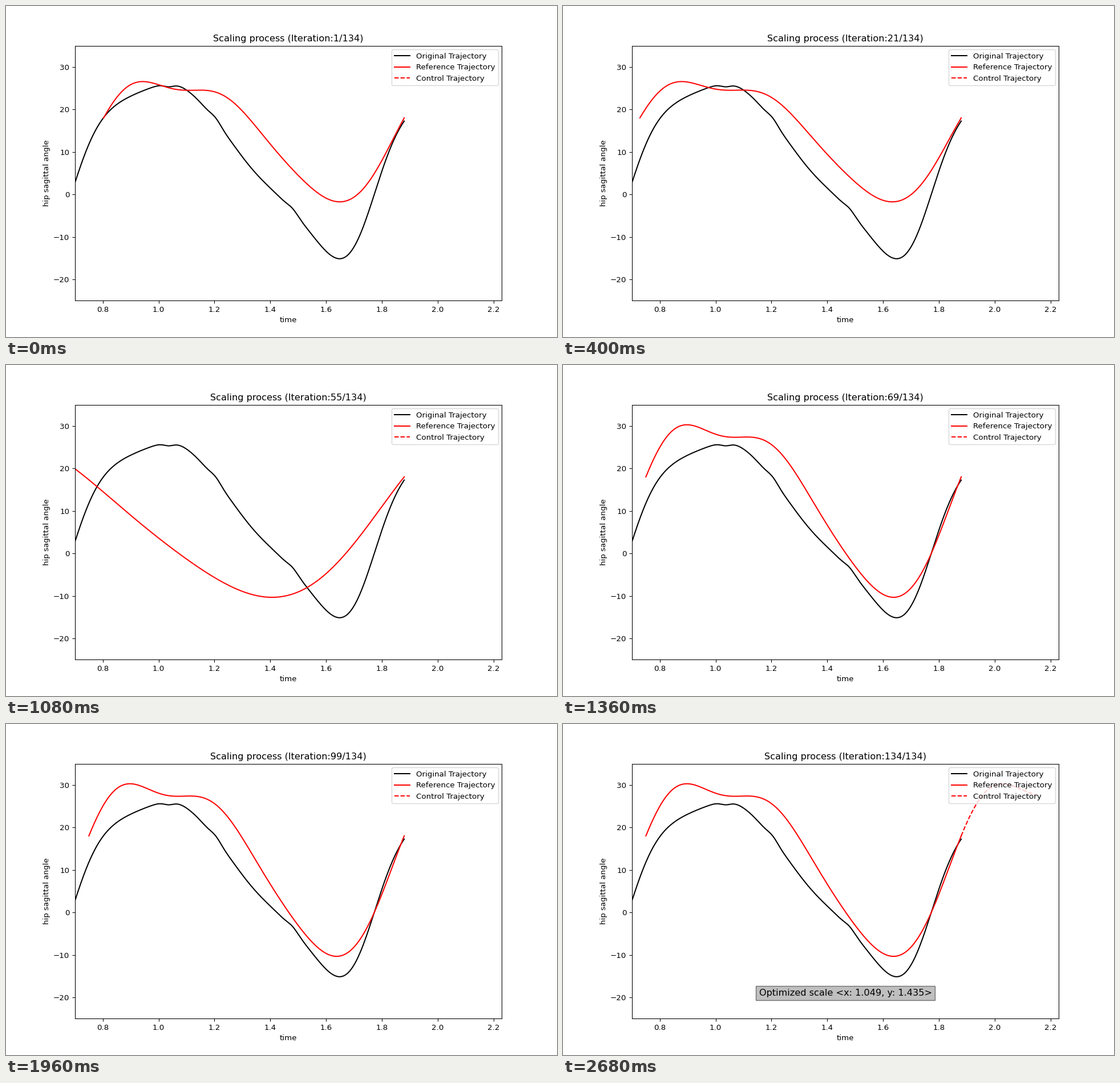
Write a matplotlib script that moves like this. It is 966 px wide and 580 px high and loops after 3.88 s.

```python
import numpy as np
import matplotlib.pyplot as plt
from matplotlib.animation import FuncAnimation

WIDTH, HEIGHT, DPI = 966, 580, 96.6
INTERVAL = 40
MOVING_FRAMES, HOLD_FRAMES = 67, 30
EVALUATIONS = 134
END_TIME, END_ANGLE = 1.88, 18.0
GOLDEN = (1 + 5**0.5) / 2

# Line searches: first evaluation, axis (0 = time, 1 = angle), scale found.
SEARCHES = [(2, 0, 1.069), (22, 1, 1.424), (32, 0, 1.0495),
            (44, 1, 1.4345), (54, 0, 1.049), (76, 1, 1.435)]
# Bracketing and golden-section offsets that open every search.
PROBES = [0, 1, -GOLDEN, 0, 1 - GOLDEN, 2 - GOLDEN]


def gait(phase, mean, cosines, sines):
    """Periodic joint angle as a short Fourier series."""
    angle = np.full_like(phase, mean)
    for k, (a, b) in enumerate(zip(cosines, sines), start=1):
        angle += a * np.cos(k * phase) + b * np.sin(k * phase)
    return angle


def bump(t, center, height, width=0.018):
    return height * np.exp(-0.5 * ((t - center) / width) ** 2)


def original_curve():
    t = np.linspace(0.66, END_TIME, 400)
    angle = gait(2 * np.pi * (t - 0.8) / 1.086, 8.43,
                 (4.25, 3.06, 2.05, 0.2, -0.07, -0.1),
                 (18.7, 1.94, -1.3, -0.65, -0.12, 0))
    return t, angle + bump(t, 1.036, -0.65) + bump(t, 1.205, 0.7) + bump(t, 1.48, 0.6)


def reference_curve():
    t = np.linspace(0.803, END_TIME, 400)
    angle = gait(2 * np.pi * (t - t[0]) / (END_TIME - t[0]), 14.62,
                 (0.14, 2.78, 0.6, -0.13), (13.91, 1.59, 0.99, 0.04))
    return t, angle


def scales(evaluation):
    """Time and angle scale tried at one evaluation of the optimizer."""
    point = np.ones(2)
    round_start = point.copy()
    ends = [search[0] for search in SEARCHES[1:]] + [EVALUATIONS + 2]
    for (start, axis, best), end in zip(SEARCHES, ends):
        if evaluation < start:
            break
        step, origin = evaluation - start, point[axis]
        if axis == 0:
            round_start = point.copy()
        if step < len(PROBES):
            point[axis] += PROBES[step]
            break
        # Angle is quadratic and settles at once; time closes in gradually.
        gap = 0.13 * 0.6 ** (step - 7) if axis == 0 and evaluation < end else 0
        point[axis] = best - gap * (best - origin)
        if axis == 1 and evaluation == end - 1:
            point = 2 * point - round_start
    return point


ref_time, ref_angle = reference_curve()

# The small margin keeps rounding from losing a pixel.
fig, ax = plt.subplots(figsize=((WIDTH + 0.01) / DPI, (HEIGHT + 0.01) / DPI), dpi=DPI)
ax.set_xlim(0.7, 2.23)
ax.set_ylim(-25, 35)
ax.set_xlabel("time")
ax.set_ylabel("hip sagittal angle")
title = ax.set_title("")
ax.plot(*original_curve(), "k", label="Original Trajectory")
reference, = ax.plot([], [], "r", label="Reference Trajectory")
control, = ax.plot([], [], "r--", label="Control Trajectory")
ax.legend(loc="upper right")
result = ax.text(0.5, 0.1, "", transform=ax.transAxes, fontsize=12,
                 ha="center", va="center",
                 bbox={"facecolor": "grey", "alpha": 0.5})


def update(frame):
    evaluation = min(2 * frame + 1, EVALUATIONS)
    done = evaluation == EVALUATIONS
    sx, sy = scales(evaluation)
    t = END_TIME + sx * (ref_time - END_TIME)
    angle = END_ANGLE + sy * (ref_angle - END_ANGLE)
    reference.set_data(t, angle)
    title.set_text(f"Scaling process (Iteration:{evaluation}/{EVALUATIONS})")
    ahead = t - t[0] + END_TIME
    shown = (ahead <= 2.154) & done
    control.set_data(ahead[shown], angle[shown])
    result.set_text(f"Optimized scale <x: {sx:.3f}, y: {sy:.3f}>")
    result.set_visible(done)
    return reference, control, title, result


anim = FuncAnimation(fig, update, frames=MOVING_FRAMES + HOLD_FRAMES,
                     interval=INTERVAL, repeat=True, repeat_delay=0, blit=False)
plt.show()
```
